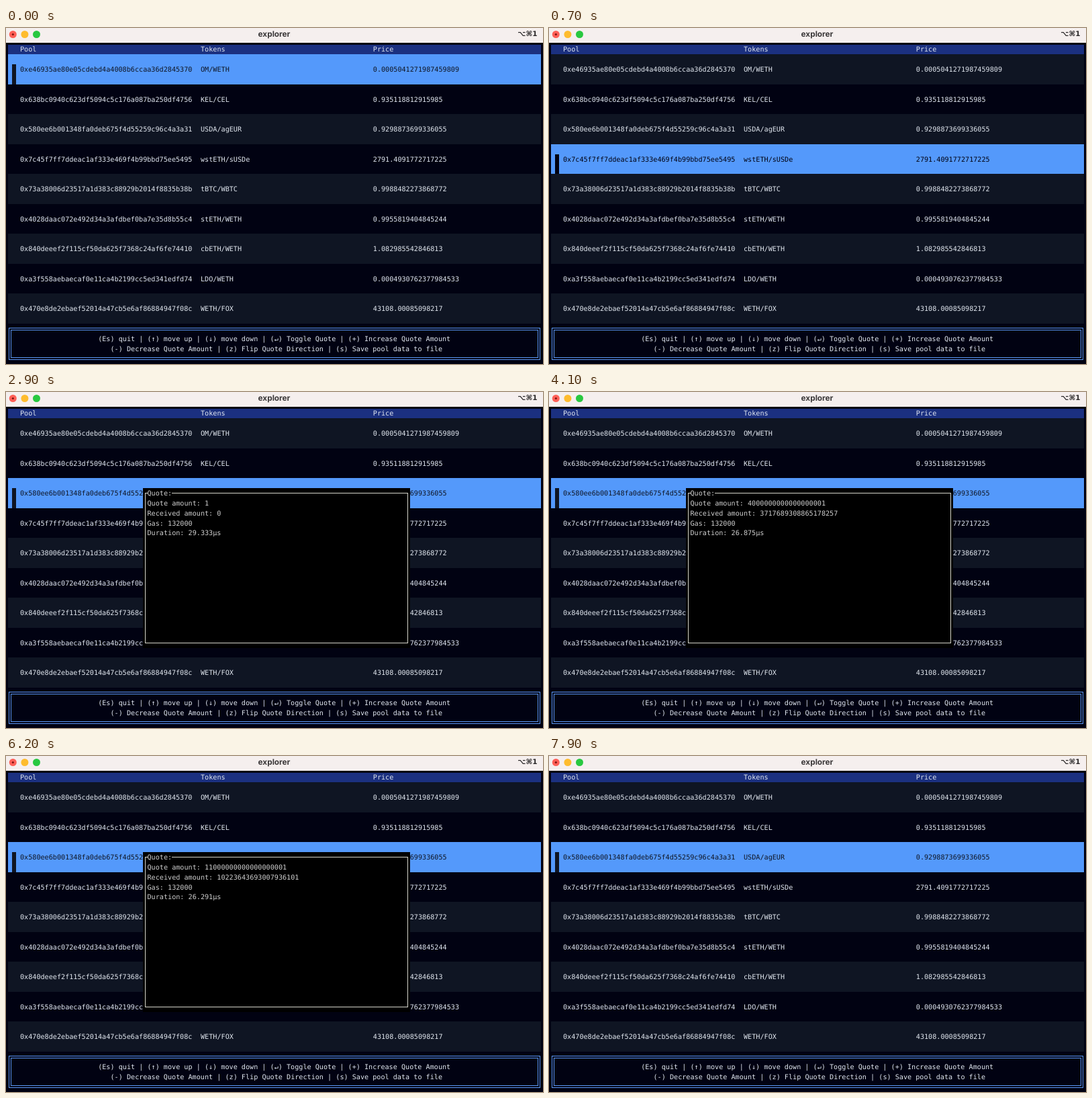
Write an HTML page that moves like this. It is 800 px wide and 500 px high and loops after 8 s.

```html
<!DOCTYPE html>
<html lang="en">
<head>
<meta charset="utf-8">
<title>explorer</title>
<style>
  html, body { margin: 0; width: 100%; height: 100%; overflow: hidden; background: #010208; }
  svg { display: block; width: 800px; height: 500px; }
  rect { shape-rendering: crispEdges; }
  text { white-space: pre; text-rendering: geometricPrecision; }
  .mono { font: 10.155px "DejaVu Sans Mono", monospace; }
  .title { font: bold 11.8px Inter, "Liberation Sans", sans-serif; fill: #3b3839; }
  .keys { font: bold 10.5px "DejaVu Sans", sans-serif; fill: #2b292a; }
</style>
</head>
<body>
<svg id="stage" viewBox="0 0 800 500" xmlns="http://www.w3.org/2000/svg"></svg>
<script>
const LOOP = 8000;
const CELL = 6.114, LINE = 14.835, LEFT = 2.65, TOP = 39.4, ROW = LINE * 3;
const WIDTH = CELL * 130, BASE = 10.9;
const DARK = ['#0f1523', '#010212'], ACTIVE = '#5499fb', LIGHT = '#e2e8f0';

const pools = [
  ['0xe46935ae80e05cdebd4a4008b6ccaa36d2845370', 'OM/WETH', '0.0005041271987459809'],
  ['0x638bc0940c623df5094c5c176a087ba250df4756', 'KEL/CEL', '0.935118812915985'],
  ['0x580ee6b001348fa0deb675f4d55259c96c4a3a31', 'USDA/agEUR', '0.9298873699336055'],
  ['0x7c45f7ff7ddeac1af333e469f4b99bbd75ee5495', 'wstETH/sUSDe', '2791.4091772717225'],
  ['0x73a38006d23517a1d383c88929b2014f8835b38b', 'tBTC/WBTC', '0.9988482273868772'],
  ['0x4028daac072e492d34a3afdbef0ba7e35d8b55c4', 'stETH/WETH', '0.9955819404845244'],
  ['0x840deeef2f115cf50da625f7368c24af6fe74410', 'cbETH/WETH', '1.082985542846813'],
  ['0xa3f558aebaecaf0e11ca4b2199cc5ed341edfd74', 'LDO/WETH', '0.0004930762377984533'],
  ['0x470e8de2ebaef52014a47cb5e6af86884947f08c', 'WETH/FOX', '43108.00085098217']
];

// [time, value] steps
const selection = [[0, 0], [100, 1], [300, 2], [700, 3], [1000, 2]];
const popupOpen = [[0, 0], [1900, 1], [7900, 0]];
const increases = [3000, 3300, 3600, 3900, 4200, 4600, 4900, 5200, 5600, 5900, 6200, 6500, 6900];
const amount = [[0, 0], ...increases.map((t, i) => [t, i + 1])];
const durations = ['29.333', '28.541', '27.916', '28.250', '26.875', '27.458', '26.625',
  '27.791', '27.125', '26.083', '25.708', '26.291', '25.166', '24.416'];

const stage = document.getElementById('stage');

function add(parent, tag, attrs, content) {
  const node = document.createElementNS(stage.namespaceURI, tag);
  for (const key in attrs) node.setAttribute(key, attrs[key]);
  if (content !== undefined) node.textContent = content;
  parent.append(node);
  return node;
}
const rect = (parent, x, y, width, height, fill, more) =>
  add(parent, 'rect', { x, y, width, height, fill, ...more });
// Terminal text: column, and top of its line
const mono = (parent, col, top, content) =>
  add(parent, 'text', { class: 'mono', x: LEFT + col * CELL, y: top + BASE }, content);
const frame = (parent, x, y, width, height, stroke) =>
  rect(parent, x, y, width, height, 'none', { stroke, 'stroke-width': 1 });
const valueAt = (steps, t) => steps.filter(step => step[0] <= t).pop()[1];

// Window
rect(stage, 0, 0, 800, 500, '#010212');
rect(stage, 0, 0, 800, 22, '#f5efee');
rect(stage, 0, 22, 800, 2, '#010208');
['#ff5f57', '#febc2e', '#28c840'].forEach((fill, i) =>
  add(stage, 'circle', { cx: 10.3 + i * 17.6, cy: 9.5, r: 5.5, fill }));
add(stage, 'circle', { cx: 10.3, cy: 9.5, r: 1.6, fill: '#7d1512' });
add(stage, 'text', { class: 'title', x: 399.5, y: 13, 'text-anchor': 'middle' }, 'explorer');
add(stage, 'text', { class: 'keys', x: 791.5, y: 12, 'text-anchor': 'end' }, '⌥⌘1');

// Table
const table = add(stage, 'g', { fill: LIGHT });
const columns = [3, 47, 89];
rect(table, LEFT, TOP - LINE, WIDTH, LINE, '#1b3080');
['Pool', 'Tokens', 'Price'].forEach((name, i) => mono(table, columns[i], TOP - LINE, name));

const rows = pools.map((pool, i) => {
  const y = TOP + i * ROW, dark = DARK[i % 2], g = add(table, 'g', {});
  const back = rect(g, LEFT, y, WIDTH, ROW, dark);
  rect(g, LEFT + CELL, y + LINE, CELL, LINE * 2, dark);
  pool.forEach((value, c) => mono(g, columns[c], y + LINE, value));
  return { g, back, dark };
});

// Footer
const footer = add(stage, 'g', { fill: LIGHT });
const footTop = TOP + 28 * LINE;
frame(footer, 4.5, 446.5, 791, 47, '#5c98f5');
frame(footer, 7.5, 449.5, 785, 41, '#5c98f5');
mono(footer, 22, footTop, '(Es) quit | (↑) move up | (↓) move down | (↵) Toggle Quote | (+) Increase Quote Amount');
mono(footer, 25, footTop + LINE, '(-) Decrease Quote Amount | (z) Flip Quote Direction | (s) Save pool data to file');

// Popup
const popup = add(stage, 'g', { fill: '#cfcfcf' });
const popTop = TOP + 7 * LINE;
rect(popup, LEFT + 33 * CELL, popTop, 65 * CELL, 16 * LINE, '#000');
frame(popup, 207.5, 150.5, 391, 223, '#d6d6cc');
rect(popup, LEFT + 34 * CELL, 148, 6 * CELL, 6, '#000');
const lines = [0, 1, 2, 3, 4].map(i => mono(popup, 34, popTop + i * LINE, ''));

// Quadratic through the received amounts for 8 and 13 units
function received(units) {
  const n = BigInt(units), a = 7435377825472152211n, b = 12082487357117769851n;
  return n * (13n * a * (13n - n) + 8n * b * (n - 8n)) / 520n;
}

function draw(t) {
  const active = valueAt(selection, t);
  rows.forEach(({ g, back, dark }, i) => {
    const on = i === active;
    g.setAttribute('fill', on ? dark : LIGHT);
    back.setAttribute('fill', on ? ACTIVE : dark);
  });
  popup.setAttribute('visibility', valueAt(popupOpen, t) ? 'visible' : 'hidden');
  const units = valueAt(amount, t);
  [
    'Quote:',
    'Quote amount: ' + (BigInt(units) * 10n ** 18n + 1n),
    'Received amount: ' + received(units),
    'Gas: 132000',
    'Duration: ' + durations[units] + 'µs'
  ].forEach((value, i) => {
    if (lines[i].textContent !== value) lines[i].textContent = value;
  });
}

const start = performance.now();
function tick() {
  draw((performance.now() - start) % LOOP);
  requestAnimationFrame(tick);
}
tick();
</script>
</body>
</html>
```
